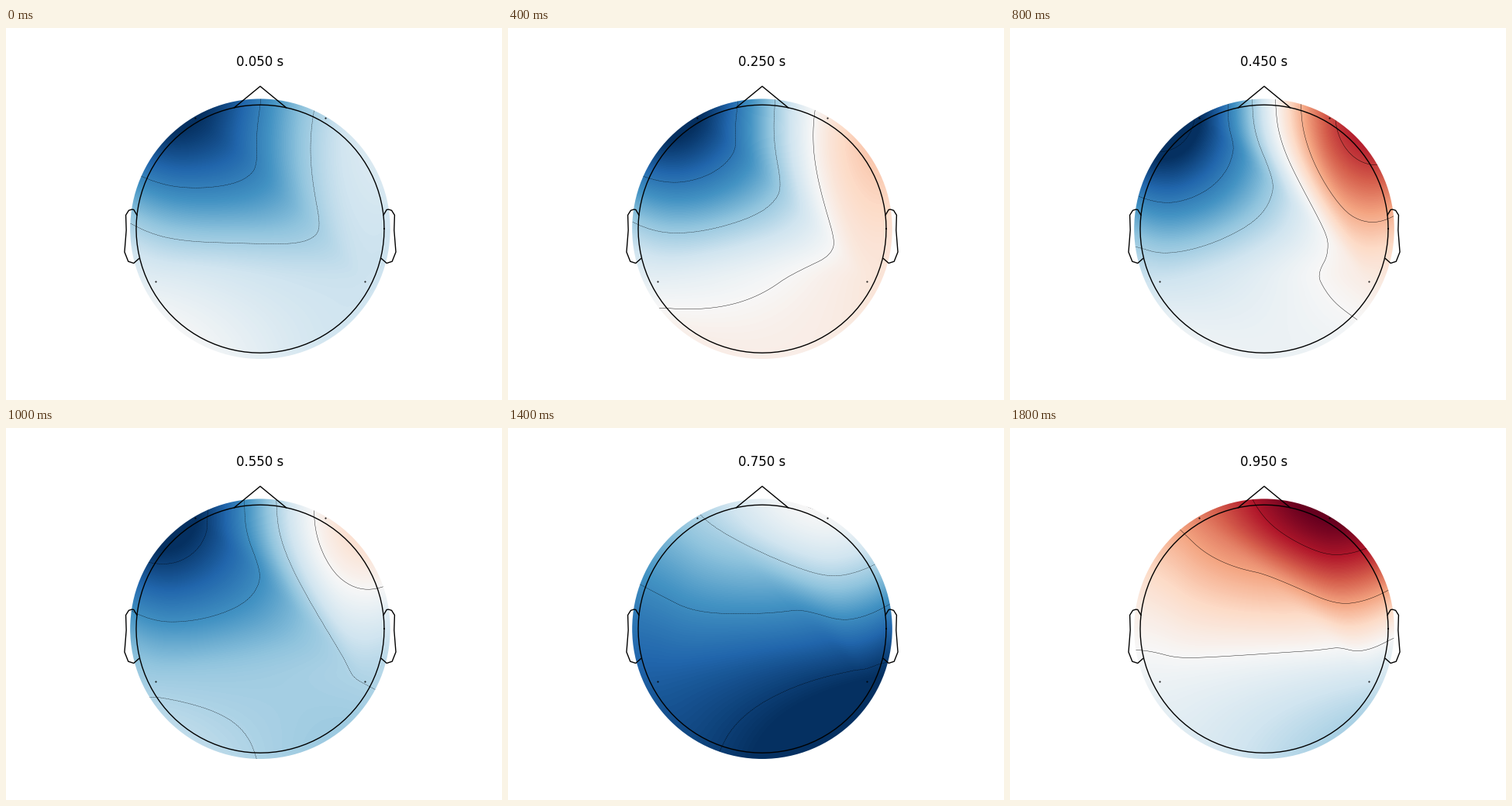
These frames come from a looping animation (640 px wide and 480 px high, 2 s). A matplotlib script:

```python
import numpy as np
import matplotlib.pyplot as plt
from matplotlib.animation import FuncAnimation
from matplotlib.patches import Circle
from matplotlib.tri import Triangulation

W, H, DPI = 640, 480, 100
CX, CY = 328, 259.2              # head centre on the stage
HEAD, RIM = 160, 167.8           # head outline and edge of the colour map
GRID = 64
FRAMES = 10

# Four electrodes around the head centre, y upwards: front left, front right,
# back left, back right. The first one sits a touch inside the common circle,
# which settles the diagonal of the mesh.
SENSORS = np.array([(-83.9, 142.9), (84, 143), (-135, -68), (135, -68)])

# Key readings of the electrodes over time, in contour steps.
KEYS = {
    0.05: (-2.94, -0.82, -0.34, -0.62),
    0.25: (-2.76, 0.26, -0.24, 0.30),
    0.45: (-2.90, 1.86, -0.59, 0.23),
    0.55: (-3.23, 0.22, -1.13, -0.99),
    0.65: (-1.98, -0.21, -2.60, -3.10),
    0.85: (-0.13, 0.09, -2.65, -3.24),
    0.95: (1.25, 2.48, -0.13, -0.47),
}


def cross(a, b):
    return a[:, 0] * b[:, 1] - a[:, 1] * b[:, 0]


def barycentric(corners, q):
    a = corners[:, 0] - corners[:, 2]
    b = corners[:, 1] - corners[:, 2]
    d = q - corners[:, 2]
    det = cross(a, b)
    u, v = cross(d, b) / det, cross(a, d) / det
    return np.stack([u, v, 1 - u - v], axis=1)


def build_mesh():
    """Electrodes plus a far ring of twelve support points."""
    tri = Triangulation(*SENSORS.T)
    p = SENSORS[tri.triangles]
    spacing = np.median(np.linalg.norm(p - np.roll(p, 1, axis=1), axis=2))
    angle = np.linspace(0, 2 * np.pi, 12, endpoint=False)
    radius = 1.1 * RIM + spacing
    ring = radius * np.column_stack([np.cos(angle), np.sin(angle)])
    pts = np.vstack([SENSORS, ring])
    return pts, Triangulation(*pts.T)


def node_values(n, edges):
    """Unit response of every node to each electrode; the ring takes means."""
    k = len(SENSORS)
    values = np.zeros((n, k))
    values[:k] = np.eye(k)
    for i in range(k, n):
        near = edges[(edges == i).any(axis=1)].ravel()
        near = near[near < k]
        values[i] = values[near].mean(axis=0) if len(near) else 1 / k
    return values


def node_gradients(pts, edges, values):
    """Gradients of least bending along the mesh edges."""
    n = len(pts)
    a = np.zeros((n, 2, n, 2))
    rhs = np.zeros((n, 2, values.shape[1]))
    for i, j in np.vstack([edges, edges[:, ::-1]]):
        e = pts[j] - pts[i]
        w = np.linalg.norm(e) ** -3
        a[i, :, i] += 4 * w * np.outer(e, e)
        a[i, :, j] += 2 * w * np.outer(e, e)
        rhs[i] += 6 * w * np.outer(e, values[j] - values[i])
    sol = np.linalg.solve(a.reshape(2 * n, 2 * n), rhs.reshape(2 * n, -1))
    return sol.reshape(n, 2, -1)


def responses(q):
    """Clough-Tocher weights of the four electrodes at points q."""
    pts, mesh = build_mesh()
    values = node_values(len(pts), mesh.edges)
    grads = node_gradients(pts, mesh.edges, values)
    t = mesh.get_trifinder()(q[:, 0], q[:, 1])
    nodes = mesh.triangles[t]
    p = pts[nodes]
    f = [values[nodes[:, i]] for i in range(3)]
    centroids = pts[mesh.triangles].mean(axis=1)

    # Control points on the edges and next to the corners.
    c = {}
    for i in range(3):
        for j in range(3):
            if i != j:
                slope = np.einsum("nd,ndm->nm", p[:, j] - p[:, i],
                                  grads[nodes[:, i]])
                c[i, j] = f[i] + slope / 3
    s = [(f[i] + c[i, (i + 1) % 3] + c[i, (i + 2) % 3]) / 3 for i in range(3)]

    # Control points that join neighbouring triangles smoothly.
    mid = []
    for k in range(3):
        i, j = (k + 1) % 3, (k + 2) % 3
        other = mesh.neighbors[t, i]
        b = barycentric(p, centroids[other])
        g = (2 * b[:, j] + b[:, i] - 1) / (2 - 3 * b[:, j] - 3 * b[:, i])
        g = np.where(other < 0, -0.5, g)[:, None]
        mid.append((g * (-f[i] + 3 * c[i, j] - 3 * c[j, i] + f[j])
                    - f[i] + 2 * c[i, j] - c[j, i] + s[i] + s[j]) / 2)
    inner = [(mid[(i + 1) % 3] + mid[(i + 2) % 3] + s[i]) / 3
             for i in range(3)]

    b = barycentric(p, q)
    low = b.min(axis=1, keepdims=True)
    b4 = 3 * low
    b = [b[:, [i]] - low for i in range(3)]
    out = b4 ** 3 * sum(inner) / 3
    for i in range(3):
        j, k = (i + 1) % 3, (i + 2) % 3
        out = (out + b[i] ** 3 * f[i]
               + 3 * b[i] ** 2 * (b[j] * c[i, j] + b[k] * c[i, k] + b4 * s[i])
               + 6 * b[j] * b[k] * b4 * mid[i]
               + 3 * b[i] * b4 ** 2 * inner[i])
    return out


times = 0.05 + 0.1 * np.arange(FRAMES)
readings = np.column_stack([np.interp(times, list(KEYS), column)
                            for column in zip(*KEYS.values())])

axis = np.linspace(-RIM, RIM, GRID)
gx, gy = np.meshgrid(axis, axis)
basis = responses(np.column_stack([gx.ravel(), gy.ravel()]))
maps = (readings @ basis.T).reshape(FRAMES, GRID, GRID)

fig = plt.figure(figsize=(W / DPI, H / DPI), dpi=DPI, facecolor="white")
ax = fig.add_axes([0, 0, 1, 1])
ax.axis("off")

image = ax.imshow(maps[0], extent=(-RIM, RIM, -RIM, RIM), origin="lower",
                  cmap="RdBu_r", interpolation="bilinear", aspect="auto")
disc = Circle((0, 0), RIM, transform=ax.transData)
image.set_clip_path(disc)
ax.set(xlim=(-CX, W - CX), ylim=(CY - H, CY))
ax.set_autoscale_on(False)


def outline(x, y):
    ax.plot(HEAD * np.asarray(x), HEAD * np.asarray(y), "k", lw=1, zorder=4)


turn = np.linspace(0, 2 * np.pi, 101)
outline(np.cos(turn), np.sin(turn))
nose = np.deg2rad(12)
base = np.sqrt(1 - nose ** 2)
outline([-nose, 0, nose], [base, 1.15, base])
ear_x = 2 * np.array([.497, .510, .518, .5299, .5419,
                      .54, .547, .532, .510, .489])
ear_y = 2 * np.array([.0555, .0775, .0783, .0746, .0555,
                      -.0055, -.0932, -.1313, -.1384, -.1199])
for side in (1, -1):
    outline(side * ear_x, ear_y)
ax.plot(*SENSORS.T, "k.", ms=1, zorder=4)
title = ax.text(0, CY - 49.3, "", fontsize=12, family="DejaVu Sans",
                ha="center", va="baseline")
contours = []


def draw(i):
    while contours:
        contours.pop().remove()
    # Each moment is coloured relative to its own strongest electrode.
    peak = np.abs(readings[i]).max()
    image.set_data(maps[i])
    image.set_clim(-peak, peak)
    lines = ax.contour(axis, axis, maps[i], levels=np.arange(-3, 4),
                       colors="k", linewidths=0.3, zorder=3)
    lines.set_clip_path(disc)
    contours.append(lines)
    title.set_text(f"{times[i]:.3f} s")


anim = FuncAnimation(fig, draw, frames=FRAMES, interval=200, repeat=True,
                     repeat_delay=0, blit=False)
plt.show()
```
